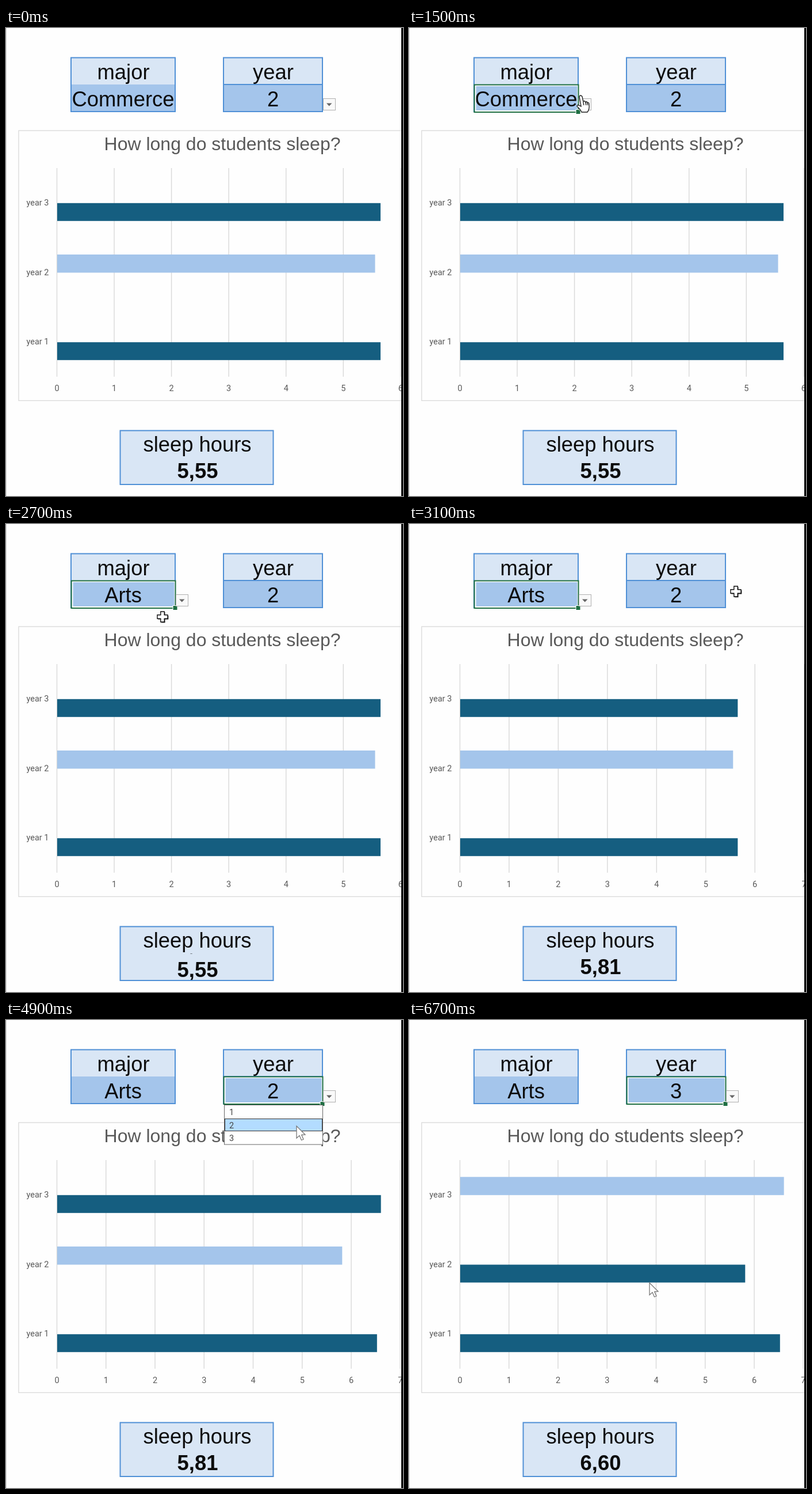
Recreate the animation shown at these times as an HTML page with a canvas. Size 690 by 812 pixels, loop 6.8 s.

```html
<!DOCTYPE html>
<html lang="en">
<head>
<meta charset="utf-8">
<title>How long do students sleep?</title>
<style>
html, body { margin: 0; width: 100%; height: 100%; overflow: hidden; background: #fefefe; }
canvas { display: block; }
</style>
</head>
<body>
<canvas id="stage" width="690" height="812"></canvas>
<script>
const ctx = document.getElementById('stage').getContext('2d');
const LOOP = 6800, STEP = 100;
const SANS = '"Liberation Sans", Arial, sans-serif', LABEL = 'Roboto, sans-serif';
const BLUE = '#5090d6', PALE = '#d9e6f5', LIGHT = '#a4c5eb', DARK = '#155e80', GREEN = '#1f6f43';
const AXIS = 88.5;

// Moments of the clicks
const PICK_MAJOR = 1000, OPEN_MAJOR = 1800, SET_MAJOR = 2600;
const PICK_YEAR = 3400, OPEN_YEAR = 4400, SET_YEAR = 6000;

const SLEEP_BEFORE = [5.645, 5.55, 5.645], SLEEP_AFTER = [6.52, 5.81, 6.6];

// time, x, y, pointer shape from then on
const PATH = [
  [300, 568, 117, 'cross'], [700, 568, 117, 'cross'], [1000, 230, 125, 'cross'],
  [1100, 230, 125, 'cross'], [1500, 299, 117, 'hand'], [2000, 299, 117, 'arrow'],
  [2400, 272, 161, 'arrow'], [2600, 272, 161, 'cross'], [2700, 272, 161, 'cross'],
  [3100, 568, 117, 'cross'], [3400, 505, 122, 'cross'], [3800, 566, 122, 'hand'],
  [4500, 566, 122, 'arrow'], [4900, 505, 184, 'arrow'], [5500, 507, 209, 'arrow'],
  [6000, 507, 209, 'arrow'], [6500, 418, 456, 'arrow']
];

const mix = (a, b, p) => a + (b - a) * p;

function ease(t, start, end) {
  const p = Math.min(1, Math.max(0, (t - start) / (end - start)));
  return p * p * (3 - 2 * p);
}

function rect(x, y, w, h, fill) {
  ctx.fillStyle = fill;
  ctx.fillRect(x, y, w, h);
}

function frame(x, y, w, h, color, width) {
  ctx.strokeStyle = color;
  ctx.lineWidth = width;
  ctx.strokeRect(x, y, w, h);
}

function text(str, x, y, font, color = '#0c0c0c', align = 'center') {
  ctx.font = font;
  ctx.fillStyle = color;
  ctx.textAlign = align;
  ctx.fillText(str, x, y);
}

function shape(points, fill, stroke, width) {
  ctx.beginPath();
  points.forEach(([x, y]) => ctx.lineTo(x, y));
  ctx.closePath();
  ctx.fillStyle = fill;
  ctx.fill();
  if (!stroke) return;
  ctx.strokeStyle = stroke;
  ctx.lineWidth = width;
  ctx.stroke();
}

function cell(x, w, title, value, split) {
  const mid = x + w / 2;
  rect(x, 51, w, 47, PALE);
  rect(x, 98, w, 47, LIGHT);
  frame(x, 51.5, w, 93.5, BLUE, 2);
  if (split) rect(x, 97, w, 2, BLUE);
  text(title, mid + .5, 89, '36.4px ' + SANS);
  text(value, mid, 136, '36.4px ' + SANS);
}

function selection(x, w) {
  frame(x + 2, 100, w - 3, 44, '#fff', 2);
  frame(x, 98.5, w, 47.5, GREEN, 2);
  rect(x + w - 5, 141, 9, 9, '#fff');
  rect(x + w - 4, 142, 7, 7, GREEN);
}

function button(x) {
  rect(x, 122, 21, 21, '#f9f9f9');
  frame(x + .5, 122.5, 21, 20, '#b0b0b0', 1);
  shape([[x + 6, 130.5], [x + 15.5, 130.5], [x + 10.7, 135.5]], '#666');
}

function list(x, w, items, current, hoverY) {
  const row = 22.5, top = 148;
  const hover = hoverY > top ? Math.floor((hoverY - top) / row) : current;
  rect(x, 147, w, items.length * row + 2, '#fff');
  frame(x + .5, 147.5, w, items.length * row + 1, '#666', 1);
  items.forEach((item, i) => {
    const y = top + i * row;
    if (i === hover) {
      rect(x + 1, y + 1, w - 1, row - 1, '#b3dcff');
      frame(x + 1.5, y + 1, w - 2, row - 1.5, '#333', 1);
    }
    text(item, x + 9, y + 17, '14.5px ' + LABEL, '#444', 'left');
  });
}

function chart(t) {
  const unit = mix(99.55, 85.25, ease(t, 2700, 3130));
  const grow = ease(t, 3100, 3600), swap = ease(t, SET_YEAR, 6400);
  const lightShare = [0, 1 - swap, swap];
  frame(22, 178, 700, 468.5, '#d9d9d9', 1.3);
  text('How long do students sleep?', 376, 212, '32px ' + SANS, '#595959');
  for (let i = 0; i < 8; i++) {
    const x = AXIS + i * unit;
    rect(x - .7, 243, 1.4, 362, '#d9d9d9');
    text(i, x, 630, '14.5px ' + LABEL, '#595959');
  }
  lightShare.forEach((share, i) => {
    const y = 545.2 - i * 120.7;
    const length = mix(SLEEP_BEFORE[i], SLEEP_AFTER[i], grow) * unit;
    rect(AXIS + .5, y - 31.5, length * share, 31.5, LIGHT);
    rect(AXIS + .5, y, length * (1 - share), 31, DARK);
    text('year ' + (i + 1), 74.5, y + 4, '14.5px ' + LABEL, '#595959', 'right');
  });
}

function result(t) {
  const late = t >= SET_YEAR;
  const [from, to] = late ? ['5,81', '6,60'] : ['5,55', '5,81'];
  const shift = 46 * (late ? ease(t, 6000, 6300) : ease(t, 2650, 2900));
  const font = 'bold 36.4px ' + SANS;
  rect(198, 698, 266, 94, PALE);
  text('sleep hours', 332.5, 735, '36.4px ' + SANS);
  ctx.save();
  ctx.beginPath();
  ctx.rect(198, 745, 266, 46);
  ctx.clip();
  text(from, 333, 781 + shift, font);
  text(to, 333, 735 + shift, font);
  ctx.restore();
  frame(198.5, 698.5, 266, 93.5, BLUE, 2);
}

const POINTERS = {
  cross() {
    const a = 3.2, b = 9;
    const plus = [[-a, -b], [a, -b], [a, -a], [b, -a], [b, a], [a, a],
      [a, b], [-a, b], [-a, a], [-b, a], [-b, -a], [-a, -a]];
    shape(plus.map(([x, y]) => [x + 1.3, y + 1.3]), '#111');
    shape(plus, '#fff', '#111', 1.4);
  },
  arrow() {
    shape([[0, 0], [0, 21], [5, 16.5], [8.5, 24.5], [12, 23], [8.7, 15.3], [15, 15]], '#fff', '#777', 1.3);
  },
  hand() {
    ctx.beginPath();
    ctx.moveTo(-3, 2);
    ctx.quadraticCurveTo(-1, -2, 2, 2);
    ctx.lineTo(4, 11);
    ctx.quadraticCurveTo(6, 8, 8, 12);
    ctx.quadraticCurveTo(10, 9, 11, 13);
    ctx.quadraticCurveTo(14, 11, 14, 16);
    ctx.quadraticCurveTo(15, 24, 11, 29);
    ctx.lineTo(1, 29);
    ctx.quadraticCurveTo(-1, 24, -7, 19);
    ctx.quadraticCurveTo(-7, 15, -2, 18);
    ctx.lineTo(0, 19);
    ctx.closePath();
    ctx.fillStyle = '#fff';
    ctx.fill();
    ctx.strokeStyle = '#222';
    ctx.lineWidth = 1.4;
    ctx.stroke();
    ctx.beginPath();
    for (const x of [4, 8, 11]) {
      ctx.moveTo(x, 12);
      ctx.lineTo(x + .8, 17);
    }
    ctx.stroke();
  }
};

function pointerAt(t) {
  const next = PATH.findIndex(key => key[0] > t);
  if (next === 0) return null;
  const a = PATH.at(next < 0 ? -1 : next - 1), b = next < 0 ? a : PATH[next];
  const p = a === b ? 0 : ease(t, a[0], b[0]);
  return { x: mix(a[1], b[1], p), y: mix(a[2], b[2], p), kind: a[3] };
}

function draw(t) {
  const pointer = pointerAt(t);
  const onMajor = t >= PICK_MAJOR && t < PICK_YEAR;
  rect(0, 0, 690, 812, '#fefefe');
  rect(0, 0, 1, 812, '#d9d9d9');
  chart(t);
  cell(113, 181, 'major', t < SET_MAJOR ? 'Commerce' : 'Arts', false);
  cell(378, 172, 'year', t < SET_YEAR ? '2' : '3', true);
  result(t);
  if (onMajor) selection(113.5, 181);
  if (t >= PICK_YEAR) selection(378.5, 172);
  button(onMajor ? 295 : 551);
  if (t >= OPEN_MAJOR && t < SET_MAJOR) list(114, 180, ['Arts', 'Commerce'], 1, pointer.y);
  if (t >= OPEN_YEAR && t < SET_YEAR) list(379, 171, ['1', '2', '3'], 1, pointer.y);
  if (pointer) {
    ctx.save();
    ctx.translate(pointer.x, pointer.y);
    POINTERS[pointer.kind]();
    ctx.restore();
  }
  rect(687, 0, 3, 812, '#000');
}

const start = performance.now();
function tick() {
  const t = (performance.now() - start) % LOOP;
  draw(Math.floor(t / STEP) * STEP);
  requestAnimationFrame(tick);
}
tick();
</script>
</body>
</html>
```
